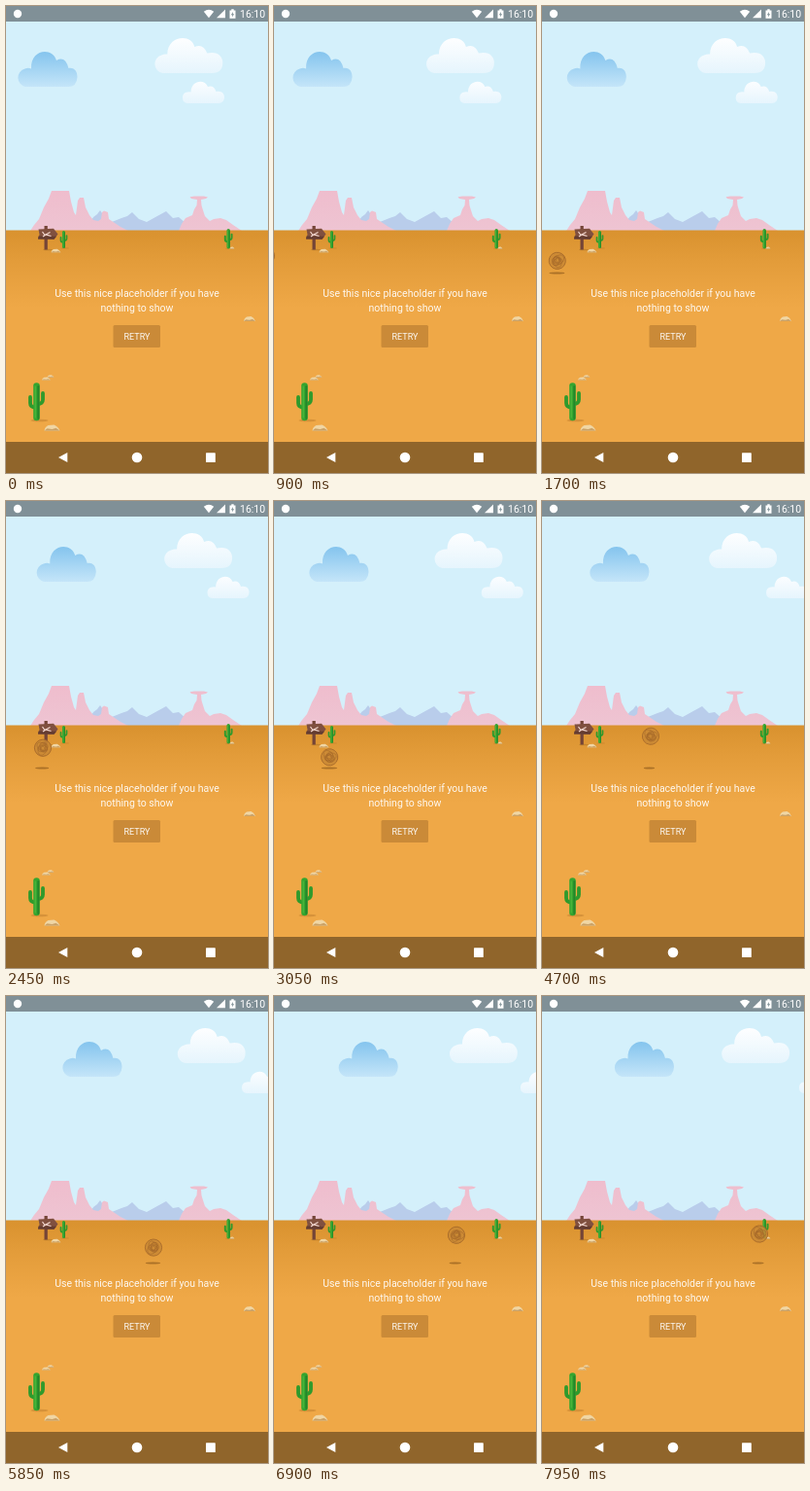
Animation of 270 by 480 pixels, one loop 8 s. Source, as an HTML page:

```html
<!DOCTYPE html>
<html lang="en">
<head>
<meta charset="utf-8">
<title>Desert placeholder</title>
<style>
  html, body { margin: 0; width: 100%; height: 100%; overflow: hidden; background: #d4f0fb; }
  svg { display: block; width: 100vw; height: 100vh; }
  text { font-family: Roboto, sans-serif; fill: #fff; }
</style>
</head>
<body>
<svg viewBox="0 0 270 480">
  <defs>
    <linearGradient id="ground" gradientUnits="userSpaceOnUse" x1="0" y1="231" x2="0" y2="310">
      <stop offset="0" stop-color="#d9922f"/>
      <stop offset=".4" stop-color="#e39c3a"/>
      <stop offset="1" stop-color="#efa847"/>
    </linearGradient>
    <linearGradient id="blue" gradientUnits="userSpaceOnUse" x1="0" y1="48" x2="0" y2="84">
      <stop offset="0" stop-color="#86c5ee"/>
      <stop offset="1" stop-color="#c6e6f9"/>
    </linearGradient>
    <linearGradient id="white" gradientUnits="userSpaceOnUse" x1="0" y1="34" x2="0" y2="69">
      <stop offset="0" stop-color="#fdfeff"/>
      <stop offset="1" stop-color="#e6f5fd"/>
    </linearGradient>
    <linearGradient id="pale" gradientUnits="userSpaceOnUse" x1="0" y1="78" x2="0" y2="100">
      <stop offset="0" stop-color="#fbfdff"/>
      <stop offset="1" stop-color="#e6f5fd"/>
    </linearGradient>
    <linearGradient id="mesa" gradientUnits="userSpaceOnUse" x1="0" y1="190" x2="0" y2="231">
      <stop offset="0" stop-color="#efbdcd"/>
      <stop offset="1" stop-color="#eec4d2"/>
    </linearGradient>
    <g id="cactus" fill="none" stroke-linecap="round" stroke-linejoin="round">
      <ellipse cx="3" cy="39" rx="9" ry="1.3" fill="#b8772a" opacity=".45"/>
      <path d="M-6.5 15V21Q-6.5 25.500-1 25.500M6.500 11V17.500Q6.500 22 1 22" stroke="#2f9a2c" stroke-width="3.800"/>
      <path d="M0 3.500V36" stroke="#35a52f" stroke-width="6.600"/>
      <path d="M1.800 4V37" stroke="#24862a" stroke-width="2"/>
      <path d="M-1.300 4V36" stroke="#5cc047" stroke-width=".8"/>
    </g>
    <g id="rock">
      <path d="M-8 3Q-7.500-1-4-2.500L2-3Q6-1.500 8 3Z" fill="#f0d6a4"/>
      <path d="M-8 3L-5 0.800 0 1.500 4 .3 8 3Z" fill="#caa268"/>
    </g>
  </defs>

  <rect width="270" height="232" fill="#d4f0fb"/>
  <g id="cloudWhite" fill="url(#white)">
    <path d="M10 69A9.500 9.500 0 0 1 9 50.500Q12 49 15 49.500C15 30 40 28 43 42Q52 38 56 48.500C67 46 72 52 72 58Q72 69 61 69Z"/>
  </g>
  <g id="cloudPale" fill="url(#pale)">
    <path d="M6 100A5.800 5.800 0 0 1 6 88.500Q8 88 9.500 88.500C10 76 24 75 27 83Q33 81 35.500 88C41 86.500 44 90 44 93.500Q44 100 38 100Z"/>
  </g>
  <g id="cloudBlue" fill="url(#blue)">
    <path d="M9 83A9.500 9.500 0 0 1 8.500 64.500Q12 63 15 64.500C14 44 37 42 41 56Q50 51 53.500 64C60 63 62.500 68 62.500 73Q62 83 53 83Z"/>
  </g>

  <path d="M82 231L90 217 94 214 97 210 101 216 109 222 119 218 125 216 130 212 137 219 145 222 154 217 165 211 172 218 178 217 186 224 195 231Z" fill="#b9cdeb"/>
  <path d="M25 231L29 225 34 219 39 207 44 198 47 190H65L67 201 70 212 72 215 74 200 76 197H80L82 207 86 215 90 220 95 221 98 219 99 212 101 210.500 105 212 106 219 112 223 118 227 126 231Z" fill="url(#mesa)"/>
  <path d="M178 231L181 224 185 218 192 215 194 209 196.500 205 197 199 191 198 189.500 196.300 194 195.500H204L208 196.500 206 198 201 199 201.500 205 203 210 205 216 210 221 214 219 221 218 227 220 234 225 243 231Z" fill="url(#mesa)"/>

  <rect y="230.500" width="270" height="250" fill="url(#ground)"/>

  <use href="#cactus" transform="translate(59.500 231) scale(.46)"/>
  <use href="#cactus" transform="translate(229.200 229) scale(.52)"/>
  <use href="#cactus" transform="translate(31.500 387)"/>
  <use href="#rock" transform="translate(51.500 251.500) scale(.62)"/>
  <use href="#rock" transform="translate(233 248.500) scale(.3)"/>
  <use href="#rock" transform="translate(251 321.500) scale(.75 .8)"/>
  <use href="#rock" transform="translate(41.500 383) scale(.55 .5)"/>
  <use href="#rock" transform="translate(46 380.500) scale(.42 .4)"/>
  <use href="#rock" transform="translate(47.500 433.500)"/>

  <ellipse cx="43" cy="250.500" rx="5" ry=".8" fill="#a86f26" opacity=".5"/>
  <path d="M39.500 226H42.800V250.500H39.500Z" fill="#744437"/>
  <path d="M33.500 229.500L49 228.800 53.500 234.500 49.500 239.800 33 239.500 34.500 235Z" fill="#80503f"/>
  <path d="M33.500 236.500L52 236.800 49.500 239.800 33 239.500Z" fill="#643c31"/>
  <path d="M37.500 232L40 235.500 45.500 232.500M38 237L41 235 46.500 236.500" fill="none" stroke="#f3d9d2" stroke-width="1.200"/>

  <ellipse id="shadow" cy="274.500" ry="1" fill="#9c6522" opacity=".8"/>
  <g id="weed" fill="none" stroke="#a4682a" stroke-width=".8">
    <circle r="8.600" fill="#c98835" fill-opacity=".85"/>
    <g id="twigs"></g>
  </g>

  <g text-anchor="middle" font-size="10.500">
    <text x="135" y="299" fill-opacity=".92">Use this nice placeholder if you have</text>
    <text x="135" y="314" fill-opacity=".92">nothing to show</text>
    <rect x="110.500" y="328" width="48.500" height="23" rx="1.500" fill="#ca8a38"/>
    <text x="135" y="342.700" font-size="9" fill-opacity=".95">RETRY</text>
  </g>

  <path d="M0 0H270V16H0ZM0 448H270V480H0Z" opacity=".4"/>
  <g fill="#fff">
    <circle cx="12" cy="8" r="4.200"/>
    <path d="M203.800 5.800Q209 1.700 214.200 5.800L209 12.300Z"/>
    <path d="M217 12.300L226 3.500V12.300Z"/>
    <path d="M230.500 4.500H232.300V3.300H234.700V4.500H236.500V12.700H230.500Z"/>
    <path d="M234.200 5.800L231.800 9.200H233.300L232.900 11.600 235.200 8.200H233.700Z" fill="#7f9096"/>
    <text x="241" y="12" font-size="10.500">16:10</text>
    <path d="M54 464L63.300 459V469Z"/>
    <circle cx="135" cy="464" r="5.300"/>
    <rect x="206" y="459.300" width="9.800" height="9.800" rx=".6"/>
  </g>
</svg>
<script>
  const LOOP = 8, STEP = 0.05, GROUND_Y = 267.3, BOUNCE = 26;
  const $ = id => document.getElementById(id);

  // Horizontal path of the tumbleweed: [seconds, x]
  const path = [[0, -34], [0.9, -8], [2.45, 38], [3.7, 78], [4.7, 112], [5.85, 152], [7.95, 224], [8, 225.7]];
  // Moments when it touches the ground
  const hits = [-0.39, 0.294, 0.978, 1.662, 2.346, 3.023, 3.7, 4.397, 5.093, 5.79, 6.44, 7.09, 7.74, 8.39];

  const weedX = t => {
    const i = Math.max(1, path.findIndex(p => p[0] >= t));
    const [t0, x0] = path[i - 1], [t1, x1] = path[i];
    return x0 + (x1 - x0) * (t - t0) / (t1 - t0);
  };
  const weedHeight = t => {
    const i = hits.findIndex(h => h > t);
    const u = (t - hits[i - 1]) / (hits[i] - hits[i - 1]);
    return BOUNCE * 4 * u * (1 - u);
  };

  let twigs = '';
  for (let i = 0; i < 7; i++) {
    const r = 2.6 + i * 0.7;
    twigs += `<ellipse rx="${r}" ry="${r * 0.65}" cx="${i % 3 - 1}" transform="rotate(${i * 67})" opacity=".65"/>`;
  }
  $('twigs').innerHTML = twigs;

  const slide = (id, x) => $(id).setAttribute('transform', `translate(${x} 0)`);

  function draw(t) {
    slide('cloudBlue', 11 + 7.86 * t);
    slide('cloudWhite', 151.3 + 4 * t);
    slide('cloudPale', 181 + 10.44 * t);

    const x = weedX(t), h = weedHeight(t);
    $('weed').setAttribute('transform', `translate(${x} ${GROUND_Y - h}) rotate(${x * 6.5})`);
    $('shadow').setAttribute('cx', x - h * 0.06);
    $('shadow').setAttribute('rx', 8.7 - h * 0.12);
  }

  const start = performance.now();
  function tick() {
    const t = ((performance.now() - start) / 1000) % LOOP;
    draw(Math.floor(t / STEP) * STEP);
    requestAnimationFrame(tick);
  }
  tick();
</script>
</body>
</html>
```
